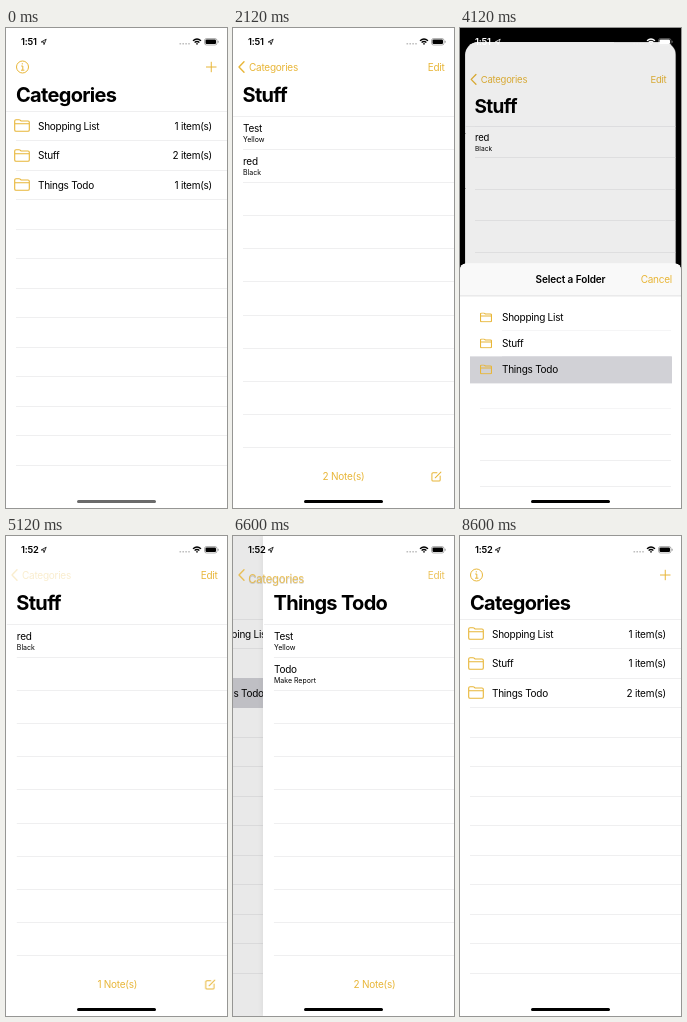
Animation, 221 px wide and 480 px high, one loop 8640 ms. Source, as an HTML page:

```html
<!DOCTYPE html>
<html lang="en">
<head>
<meta charset="utf-8">
<title>Categories</title>
<style>
:root { --gold: #e8b638; --line: #efeff0; --press: #d1d1d6; --ease: cubic-bezier(.25,.4,.2,1); }
html, body { margin: 0; width: 100%; height: 100%; overflow: hidden; background: #000; }
#stage {
  position: relative; width: 221px; height: 480px; overflow: hidden; background: #000; color: #000;
  font: 400 10px/20px Inter, "Liberation Sans", sans-serif; letter-spacing: -.25px;
}
#stage *, .home::after { position: absolute; box-sizing: border-box; white-space: nowrap; }
#stage svg * { position: static; }
svg { fill: none; stroke: var(--gold); overflow: visible; }

/* every moving part shares one 8.64 s cycle */
.card, .shade, .sheet, .home, .home::after, .stuff, .todo, .homeNav, .bigTitle, .back, .backText, .edit,
.status, .bar, .press, .was, .now, .wasNote, .nowNote {
  animation: 8640ms var(--ease) infinite both;
}

/* text is placed by the middle of its capitals */
.t { top: calc(var(--y) * 1px - 10px); left: 10px; }
.r { left: auto; right: 15px; }
.c { left: 0; width: 221px; text-align: center; }
.gold { color: var(--gold); }
.small { font-size: 7px; letter-spacing: 0; }
.big { left: 9.5px; font-size: 20px; font-weight: 700; letter-spacing: -.68px; }

.full { inset: 0; }
.view { inset: 0; background: #fff; }
.rule { left: 0; right: 0; height: 1px; background: var(--line); }
.lines { left: 10px; right: 0; background: repeating-linear-gradient(var(--line) 0 1px, transparent 1px var(--gap)); }
.home .lines { --gap: 29.5px; top: 83px; height: 355px; }
.detail .lines { --gap: 33.1px; top: 88px; height: 332px; }
.detail { box-shadow: -1px 0 #fff, 0 0 6px rgba(0,0,0,.12); }
.home .t:not(.r) { left: 32px; }
.folder { left: 8px; top: calc(var(--y) * 1px - 6.5px); width: 16px; height: 13px; }
.compose { left: 198px; top: 442.5px; width: 11px; height: 11px; }
.press { left: 0; right: 0; background: var(--press); opacity: 0; }

.card { inset: 0; overflow: hidden; background: #fff; transform-origin: 50% 0; animation-name: card; }
.shade { inset: 0; background: #000; animation-name: shade; }
.home { animation-name: home; }
.home::after { content: ""; inset: 0 -70px 0 0; background: #000; animation-name: dim; }
.stuff { animation-name: stuff; }
.todo { animation-name: todo; }
.homeNav { animation-name: homeNav; }
.bigTitle { transform-origin: 0 50%; animation-name: bigTitle; }
.back { animation-name: back; }
.backText { animation-name: backText; }
.edit { animation-name: edit; }
.p1 { top: 113px; height: 29px; animation-name: press1; }
.p2 { top: 142px; height: 30px; animation-name: press2; }

.sheet {
  left: 0; top: 35px; width: 221px; height: 445px; overflow: hidden; background: #fff;
  border-radius: 6px 6px 22px 22px; animation-name: sheet;
}
.head { left: 0; top: 0; width: 221px; height: 33px; background: #f9f9f9; border-bottom: 1px solid #e2e2e3; }
.sheet .lines { --gap: 26px; right: 10px; }
.sheet .folder { left: 20px; top: calc(var(--y) * 1px - 5px); width: 12px; height: 10px; }
.sheet .item { left: 42px; }
.sheet .press { left: 9.5px; right: 9.5px; top: 93px; height: 27px; animation-name: pick; }

.status { inset: 0 0 auto; height: 28px; animation-name: status; }
.status svg { left: 0; top: 0; stroke: currentColor; }
.status .t { left: 15px; font-size: 9.3px; font-weight: 600; letter-spacing: -.2px; }
.bar { left: 71px; top: 472px; width: 79px; height: 3px; border-radius: 2px; animation-name: bar; }

.was { animation-name: was; }
.now { animation-name: now; }
.wasNote { animation-name: wasNote; }
.nowNote { animation-name: nowNote; }

/* pushes and pops */
@keyframes home {
  0%, 15.046%, 64.7%, 73.843%, 99.5%, 100% { transform: none; }
  20.139%, 59.259%, 79.1%, 93.981% { transform: translateX(-66px); }
}
@keyframes dim {
  0%, 15.046%, 64.7%, 73.843%, 99.5%, 100% { opacity: 0; }
  20.139%, 59.259%, 79.1%, 93.981% { opacity: .1; }
}
@keyframes stuff {
  0%, 15.046%, 64.7%, 100% { transform: translateX(230px); }
  20.139%, 59.259% { transform: none; }
}
@keyframes todo {
  0%, 73.843%, 99.5%, 100% { transform: translateX(230px); }
  79.1%, 93.981% { transform: none; }
}
@keyframes homeNav {
  0%, 15.046%, 64%, 73.843%, 99%, 100% { opacity: 1; }
  17.5%, 60.5%, 76.3%, 95.3% { opacity: 0; }
}
@keyframes bigTitle {
  0%, 15.046%, 64.7%, 73.843%, 99.5%, 100% { transform: none; opacity: 1; }
  20.139%, 59.259%, 79.1%, 93.981% { transform: translate(6px, -27px) scale(.49); opacity: 0; }
}
@keyframes backText {
  0%, 15.046%, 64.7%, 73.843%, 99.5%, 100% { left: 10px; top: 56px; font-size: 20px; }
  20.139%, 59.259%, 79.1%, 93.981% { left: 16px; top: 29px; font-size: 10px; }
}
@keyframes back {
  0%, 15.5%, 62%, 74.3%, 97%, 100% { opacity: 0; }
  20.1%, 58.32%, 79.1%, 93.04% { opacity: 1; }
  58.33%, 59.25%, 93.05%, 93.98% { opacity: .25; }
}
@keyframes edit {
  0%, 15.5%, 62%, 74.3%, 97%, 100% { opacity: 0; }
  20.1%, 59.25%, 79.1%, 93.98% { opacity: 1; }
}
@keyframes press1 {
  0%, 14.8%, 21%, 100% { opacity: 0; }
  14.81%, 20.99% { opacity: 1; }
}
@keyframes press2 {
  0%, 71.28%, 80%, 100% { opacity: 0; }
  71.29%, 79.99% { opacity: 1; }
}

/* folder sheet */
@keyframes card {
  0%, 26.61%, 52.33%, 100% { transform: none; border-radius: 0; }
  26.62%, 52.315% { transform: none; border-radius: 22px; }
  32.639%, 46.56% { transform: translateY(26px) scale(.91); border-radius: 6px; }
}
@keyframes shade {
  0%, 26.62%, 52.315%, 100% { opacity: 0; }
  32.639%, 46.56% { opacity: .13; }
}
@keyframes sheet {
  0%, 26.62%, 52.315%, 100% { transform: translateY(446px); }
  32.639%, 46.56% { transform: none; }
}
@keyframes pick {
  0%, 46.28%, 53%, 100% { opacity: 0; }
  46.29%, 52.99% { opacity: 1; }
}
@keyframes status {
  0%, 28.35%, 48.62%, 100% { color: #000; }
  28.36%, 48.61% { color: #fff; }
}
@keyframes bar {
  0%, 14.8% { background: #6a6a6a; }
  14.81%, 100% { background: #000; }
}

/* values that switch after the note is moved */
@keyframes was { 0%, 58.32% { opacity: 1; } 58.33%, 100% { opacity: 0; } }
@keyframes now { 0%, 58.32% { opacity: 0; } 58.33%, 100% { opacity: 1; } }
@keyframes wasNote { 0%, 46.28% { opacity: 1; } 46.29%, 100% { opacity: 0; } }
@keyframes nowNote { 0%, 46.28% { opacity: 0; } 46.29%, 100% { opacity: 1; } }
</style>
</head>
<body>
<div id="stage">
  <svg width="0" height="0">
    <symbol id="folder" viewBox="0 0 16 13">
      <path d="M.7 11V2Q.7.7 2 .7H5Q5.7.7 6.2 1.2L7 2H14Q15.3 2 15.3 3.3V11Q15.3 12.3 14 12.3H2Q.7 12.3.7 11ZM.7 4.7H15.3" stroke-width="1.1" vector-effect="non-scaling-stroke"/>
    </symbol>
    <symbol id="compose" viewBox="0 0 12 12">
      <path d="M6.5 2H2.2Q1 2 1 3.2V9.8Q1 11 2.2 11H8.8Q10 11 10 9.8V5.5M4.6 7.4L10.8 1.2" stroke-width="1.1" stroke-linecap="round"/>
    </symbol>
  </svg>

  <div class="card">
    <div class="view home">
      <div class="lines"></div>
      <div class="rule" style="top:83px"></div>
      <div class="press p1"></div>
      <div class="press p2"></div>
      <svg class="folder" style="--y:97.5"><use href="#folder"/></svg>
      <svg class="folder" style="--y:127"><use href="#folder"/></svg>
      <svg class="folder" style="--y:156.5"><use href="#folder"/></svg>
      <span class="t" style="--y:98">Shopping List</span><span class="t r" style="--y:98">1 item(s)</span>
      <span class="t" style="--y:127">Stuff</span>
      <span class="t r was" style="--y:127">2 item(s)</span><span class="t r now" style="--y:127">1 item(s)</span>
      <span class="t" style="--y:157">Things Todo</span>
      <span class="t r was" style="--y:157">1 item(s)</span><span class="t r now" style="--y:157">2 item(s)</span>
    </div>

    <div class="view detail stuff">
      <span class="t big" style="--y:67">Stuff</span>
      <div class="lines"></div>
      <div class="rule" style="top:88px"></div>
      <div class="full wasNote">
        <span class="t" style="--y:100">Test</span><span class="t small" style="--y:111.5">Yellow</span>
        <span class="t" style="--y:133">red</span><span class="t small" style="--y:144.5">Black</span>
        <span class="t c gold" style="--y:448">2 Note(s)</span>
      </div>
      <div class="full nowNote">
        <span class="t" style="--y:100">red</span><span class="t small" style="--y:111.5">Black</span>
        <span class="t c gold" style="--y:448">1 Note(s)</span>
      </div>
      <svg class="compose"><use href="#compose"/></svg>
    </div>

    <div class="view detail todo">
      <span class="t big" style="--y:67">Things Todo</span>
      <div class="lines"></div>
      <div class="rule" style="top:88px"></div>
      <span class="t" style="--y:100">Test</span><span class="t small" style="--y:111.5">Yellow</span>
      <span class="t" style="--y:133">Todo</span><span class="t small" style="--y:144.5">Make Report</span>
      <span class="t c gold" style="--y:448">2 Note(s)</span>
      <svg class="compose"><use href="#compose"/></svg>
    </div>

    <svg class="homeNav" style="left:0;top:0" width="221" height="60">
      <circle cx="16.5" cy="39" r="6"/>
      <path d="M15.2 38H16.8V42M15 42.2H18.4M16.3 35.2V36.4"/>
      <path d="M200 39H210.5M205.25 33.8V44.2"/>
    </svg>
    <span class="t big bigTitle" style="--y:66.5">Categories</span>
    <div class="full back">
      <svg style="left:0;top:0" width="20" height="60"><path d="M11 33.8L6 39L11 44.2" stroke-width="1.4" stroke-linecap="round" stroke-linejoin="round"/></svg>
      <span class="gold backText">Categories</span>
    </div>
    <span class="t r gold edit" style="--y:39;right:9.5px">Edit</span>
    <div class="shade"></div>
  </div>

  <div class="sheet">
    <div class="head"></div>
    <span class="t c" style="--y:16;font-weight:600;letter-spacing:-.1px">Select a Folder</span>
    <span class="t r gold" style="--y:16;right:9px">Cancel</span>
    <div class="lines" style="left:42px;top:67px;height:53px"></div>
    <div class="lines" style="left:20px;top:145px;height:261px"></div>
    <div class="press"></div>
    <svg class="folder" style="--y:54"><use href="#folder"/></svg>
    <svg class="folder" style="--y:80"><use href="#folder"/></svg>
    <svg class="folder" style="--y:106"><use href="#folder"/></svg>
    <span class="t item" style="--y:54">Shopping List</span>
    <span class="t item" style="--y:80">Stuff</span>
    <span class="t item" style="--y:106">Things Todo</span>
  </div>

  <div class="status">
    <span class="t was" style="--y:14">1:51</span><span class="t now" style="--y:14">1:52</span>
    <svg width="221" height="28">
      <path d="M35.2 14L40.2 11.2L38 16.6L37.6 14Z" stroke-width=".8" stroke-linejoin="round"/>
      <path d="M173.5 15.8H184" stroke-width="1.6" stroke-dasharray="1.6 1.3" opacity=".25"/>
      <path d="M187 12.8Q191 9.2 195 12.8M188.6 14.5Q191 12.4 193.4 14.5" stroke-width="1.3"/>
      <path d="M189.8 15.6Q191 14.8 192.2 15.6L191 17Z" fill="currentColor" stroke="none"/>
      <rect x="198.5" y="10.5" width="12.5" height="6.5" rx="2" stroke-width=".6" opacity=".5"/>
      <rect x="199.5" y="11.5" width="10.5" height="4.5" rx="1.1" fill="currentColor" stroke="none"/>
      <path d="M212.2 12.8V14.7" stroke-width=".8" opacity=".5"/>
    </svg>
  </div>
  <div class="bar"></div>
</div>
</body>
</html>
```
